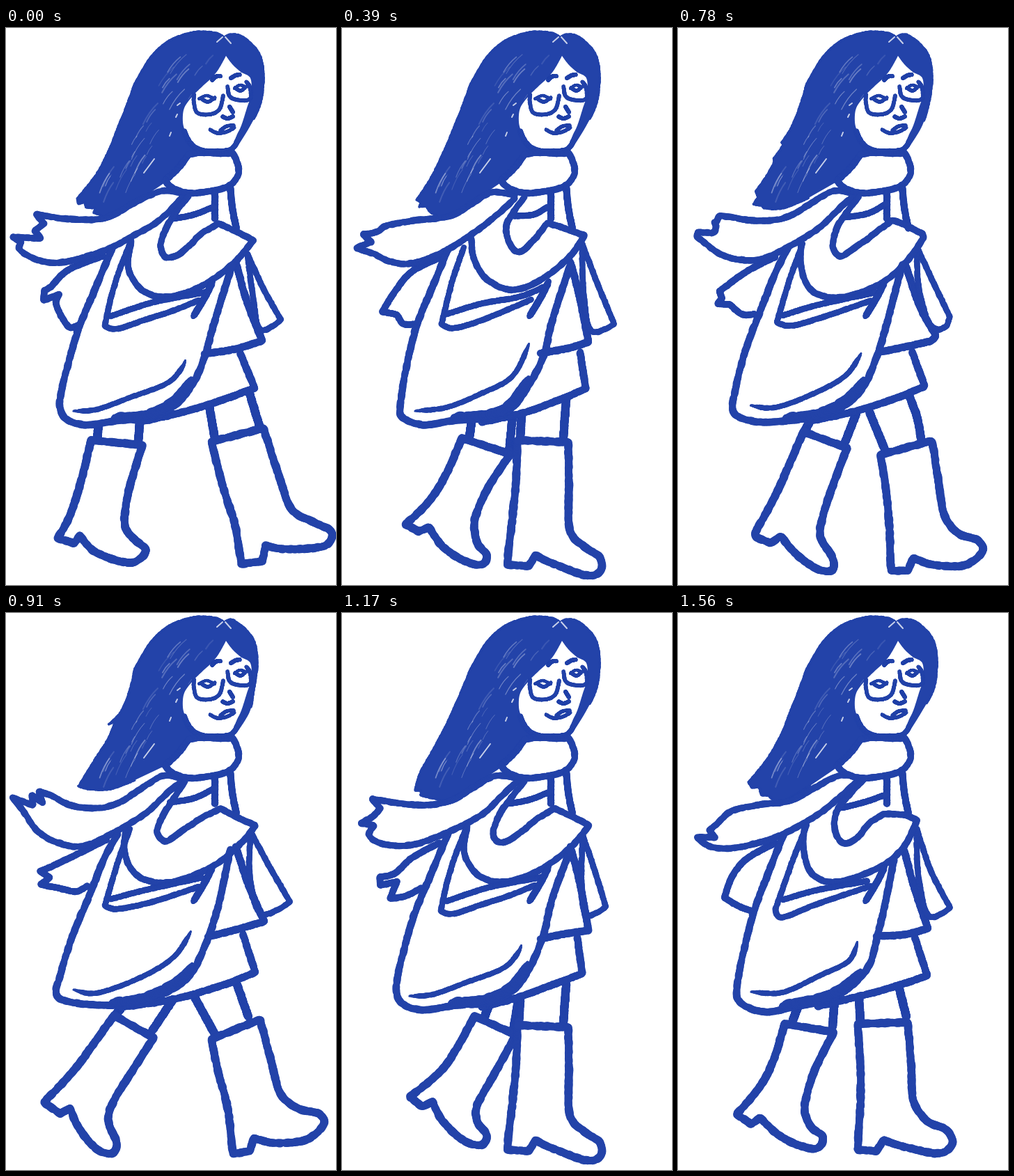
An HTML page with a canvas that plays this animation: 474 by 800 pixels, repeating every 1690 ms.

```html
<!DOCTYPE html>
<html lang="en">
<head>
<meta charset="utf-8">
<title>Walking girl</title>
<style>
html, body { margin: 0; width: 100%; height: 100%; overflow: hidden; background: #fff; }
canvas { display: block; width: 100vw; height: 100vh; }
</style>
</head>
<body>
<canvas id="stage" width="474" height="800"></canvas>
<script>
const ctx = document.getElementById('stage').getContext('2d');
const BLUE = '#2343a9', HOLD = 130, COUNT = 13, N = 240;

// Strokes are "x,y" points; "!" marks a corner, "z" closes, "|" separates strokes.
const poses = [
  { at: 0, side: 370,
    hair: '185,80 172,115 160,145 148,175 130,210 102,245! 104,253! 113,250! 115,258! 128,259! 126,265! 134,268 150,272 190,248',
    tail: '255,238 225,234 190,248 155,268 130,275 85,274 43,267! 55,281! 41,291! 50,302! 9,300! 22,308! 20,319 45,333 75,337 110,330 150,316 185,297 215,280 240,258 255,240',
    tail2: '140,327 90,347 65,371 55,377! 54,391! 76,383! 72,396 80,415 92,430 107,425',
    bag: '152,318 130,370 105,430 90,480 78,530 79,550 90,564 118,570 160,564 205,560 245,540 270,508 285,473 300,420 325,340',
    seam: '97,550 130,548 180,530 230,511 250,492 258,477',
    mouth: '180,305 163,348 150,390 142,428! 160,432 200,419 240,406 277,391|150,414 185,402 220,392 290,379',
    sleeve: '180,307 175,340 185,365 205,382 235,386 270,376 300,359 330,335 355,305! 330,292 305,281! 280,296 262,314 245,327 229,329 222,312 230,288 245,263 262,242',
    lapel: '240,274 270,268 298,257',
    coat: '330,335 345,390 368,449! 330,461 285,468',
    cuff: '347,325 370,375 395,419! 365,433 354,380 z',
    skirt: '336,466 346,490 357,517! 300,538 245,554 190,566',
    back: ['133,570 131,590|192,568 190,595', '122,592! 108,650 92,700 74,733! 98,740! 106,729! 126,751 160,765 185,767 201,750 185,735 171,715 175,670 196,599! z'],
    front: ['292,543 300,590|350,525 365,575', '295,594! 312,660 329,715 338,770! 368,766! 373,743! 395,748 430,748 461,742 467,723 440,709 410,691 391,640 370,575! z'] },
  { at: 2, side: 366,
    hair: '185,80 172,115 155,160 138,187! 126,194! 133,196! 122,215 99,235! 119,237! 97,247! 118,251! 116,258! 130,261 158,263 190,248',
    tail: '248,240 212,235 185,250 160,269 125,277 92,268 74,246 62,237! 52,238! 56,270! 42,260 29,258! 31,276 38,290! 32,295 43,310! 37,318 55,331 90,336 125,328 165,308 200,285 230,262 246,245',
    tail2: '150,325 115,345 80,358 70,365! 62,379! 86,375! 80,395 90,415 107,428',
    bag: '165,315 145,345 122,400 100,445 85,500 75,543 85,562 118,570 160,563 205,557 240,540 258,510 280,465 300,410 328,340',
    seam: '97,550 150,541 200,522 235,505 251,475',
    mouth: '190,295 165,340 145,425! 158,432 200,420 277,390|150,415 190,400 245,388 290,378',
    sleeve: '183,305 185,335 195,365 212,387 250,385 285,368 320,340 355,305! 325,290 298,279! 275,309 258,328 240,331 224,318 224,288 244,263 262,243',
    lapel: '240,270 275,267 298,256',
    coat: '328,335 340,390 353,456! 320,461 272,469',
    cuff: '347,325 364,370 382,430! 355,435 347,380 z',
    skirt: '338,465 346,531! 300,543 250,555 205,562',
    back: ['170,568 158,582|225,560 222,590 210,608', '152,580! 125,620 90,660 48,690! 66,706! 82,699! 96,730 120,755 147,766 158,752 149,733 155,705 180,665 214,617! z'],
    front: ['272,548 276,588|337,533 335,585', '265,590! 266,650 264,700 254,770! 285,771! 294,757! 320,768 365,782 390,772 386,752 361,738 344,715 342,650 340,590! z'] },
  { at: 3, side: 370,
    hair: '185,80 172,115 160,145 146,178 128,215 107,247! 113,250! 111,257! 121,256! 126,264! 134,268 150,272 190,248',
    tail: '248,240 215,236 190,250 155,270 100,277 64,284 50,293 30,296! 42,307! 20,316! 48,325! 68,335 100,338 145,322 195,290 230,262 248,245',
    tail2: '140,330 100,350 75,380 58,408! 78,412 88,425 109,425',
    bag: '152,318 135,360 110,420 95,475 84,540 88,560 118,570 160,564 215,559 245,545 270,510 290,470 302,420 328,340',
    seam: '105,550 150,545 200,525 245,500 269,453',
    mouth: '175,315 158,365 143,425! 160,431 200,420 272,390|150,411 200,396 255,386 290,372',
    sleeve: '186,303 189,330 205,358 235,375 265,372 300,352 330,325 348,298! 320,288 295,280! 275,305 255,322 241,310 236,285 248,262 262,243',
    lapel: '245,270 275,268 295,257',
    coat: '328,335 342,390 354,451! 325,460 285,467',
    cuff: '345,310 366,365 391,425! 358,435 347,380 z',
    skirt: '342,465 350,518! 310,535 260,553 200,566',
    back: ['186,566 183,588|245,558 240,608', '172,589! 150,640 125,680 91,713! 110,723! 125,717! 145,745 175,765 200,771 208,757 194,739 191,705 210,660 242,612! z'],
    front: ['258,556 256,588|322,533 318,588', '252,592! 250,650 245,700 237,771! 268,773! 278,757! 300,768 350,786 371,780 370,760 348,745 327,720 326,650 325,595! z'] },
  { at: 5, side: 369, blink: true,
    hair: '185,80 170,120 152,165 140,186! 127,196! 132,200! 122,222 105,243! 119,248! 112,258! 126,258! 125,264! 152,265 190,248',
    tail: '250,238 220,234 190,250 155,269 110,277 56,286! 71,300! 66,315! 37,325! 75,336 115,334 150,320 200,290 230,262 250,242',
    tail2: '135,332 100,350 75,378 60,404! 80,400! 85,420 103,430',
    bag: '155,315 135,360 112,420 95,475 85,535 90,560 122,570 165,564 210,559 245,540 268,510 285,465 300,410 322,340',
    seam: '112,543 150,544 200,525 240,505 261,477',
    mouth: '180,310 160,365 142,425! 165,430 205,416 277,390|150,415 200,398 285,380',
    sleeve: '182,308 183,340 190,370 210,385 245,385 290,368 325,335 351,289! 325,275 307,272! 280,300 255,318 238,328 228,315 230,285 245,262 262,243',
    lapel: '240,272 275,267 298,253',
    coat: '322,340 345,405 370,440! 364,454! 290,466',
    cuff: '335,315 356,370 379,430! 365,432 342,372 z',
    skirt: '332,468 351,513! 300,535 245,553 205,564',
    back: ['213,563 208,580|272,553 270,590', '205,582! 195,630 182,690 164,756! 190,760! 205,745! 230,765 270,783 290,780 282,758 262,735 260,700 265,650 274,596! z'],
    front: ['280,553 295,608|335,530 348,565 350,600', '286,614! 292,660 288,720 286,782! 310,786! 320,768! 345,780 390,787 418,770 411,752 385,740 371,710 367,650 365,602! z'] },
  { at: 7, side: 361,
    hair: '185,80 178,110 165,142 147,160! 157,156! 146,182 128,210 104,249! 120,253 150,253 185,240',
    tail: '252,238 225,234 190,255 165,271 135,280 95,277 65,262 47,256! 53,273! 37,261! 39,276! 9,265! 25,285 45,313 75,330 110,335 150,318 200,288 230,260 252,242',
    tail2: '145,325 105,345 70,362 49,371! 63,380! 50,390! 75,395 100,400 117,392',
    bag: '160,318 140,355 118,410 95,465 78,520 72,545 85,557 130,563 175,562 215,552 260,525 285,480 305,420 322,340',
    seam: '97,541 130,546 190,525 240,495 266,457',
    mouth: '178,310 160,360 142,420! 160,425 210,415 277,393|150,411 200,398 282,380',
    sleeve: '172,313 170,340 180,368 205,385 245,385 300,362 340,328 358,305! 335,295 308,281! 280,295 250,315 230,328 217,315 225,292 240,268 257,242',
    lapel: '235,272 270,266 301,251',
    coat: '330,335 348,390 371,443! 330,455 290,465',
    cuff: '352,315 376,360 408,415! 366,432 350,375 z',
    skirt: '340,460 358,516! 310,535 240,555 165,566',
    back: ['165,568 155,580|240,555 210,600', '155,578! 125,620 95,660 54,703! 78,719! 92,711! 105,740 130,770 152,776 159,761 147,730 155,700 180,660 212,610! z'],
    front: ['270,550 300,605|330,528 348,580', '295,612! 305,660 318,710 326,777! 350,773! 356,754! 385,761 430,757 456,735 449,719 420,712 394,690 380,640 365,584! z'] },
  { at: 9, side: 370,
    hair: '185,80 166,125 150,160 130,198 112,230 105,255! 113,255! 113,262! 130,266 152,268 190,248',
    tail: '255,238 220,234 190,250 155,270 110,276 43,267! 55,280! 46,291! 27,302! 46,305! 39,320 60,332 100,333 145,318 200,290 230,262 254,240',
    tail2: '140,330 100,352 76,374 54,379! 55,391! 79,386! 69,410! 90,407 114,395',
    bag: '152,318 130,370 105,430 90,480 78,537 88,562 118,570 160,564 210,559 248,540 272,505 290,460 302,410 328,340',
    seam: '97,550 130,548 180,530 230,511 250,492 258,477',
    mouth: '180,305 163,348 150,390 142,428! 160,432 200,419 240,406 277,391|150,414 185,402 220,392 290,379',
    sleeve: '180,307 175,340 185,365 205,382 235,386 270,376 300,359 330,335 355,305! 330,292 305,281! 280,296 250,320 229,330 217,318 226,290 245,263 262,242',
    lapel: '240,274 270,268 298,257',
    coat: '328,335 342,390 354,456! 320,461 285,468',
    cuff: '346,320 363,370 379,422! 350,433 344,380 z',
    skirt: '338,465 345,518! 300,535 250,553 200,566',
    back: ['210,566 203,585|253,558 245,605', '190,579! 165,625 140,660 97,695! 115,709! 130,702! 145,730 175,758 200,764 208,750 194,730 195,705 220,660 250,606! z'],
    front: ['256,556 254,588|322,533 318,588', '252,592! 250,650 245,700 237,771! 268,773! 278,757! 300,768 350,786 371,780 370,760 348,745 327,720 326,650 325,595! z'] },
  { at: 12, side: 372,
    hair: '185,80 172,115 160,145 148,175 128,210 101,243! 106,251! 116,250! 120,262! 130,262! 148,271 190,248',
    tail: '264,235 230,234 195,252 160,270 120,275 78,284 57,302 45,312! 53,322! 27,322! 45,335 75,338 115,330 150,318 200,290 235,262 262,238',
    tail2: '140,330 100,352 78,378 67,409! 85,420 105,428',
    bag: '152,318 135,360 112,420 98,470 85,535 90,560 125,573 165,566 215,555 250,535 275,505 285,470 298,415 310,355',
    seam: '105,544 150,545 205,520 245,500 258,472',
    mouth: '185,305 165,355 140,425! 150,437 200,418 277,392|150,412 200,398 272,385',
    sleeve: '182,305 180,335 188,368 210,385 245,383 295,362 325,335 343,298! 325,290 295,289! 275,302 255,325 236,330 225,310 228,285 245,262 268,238',
    lapel: '235,280 270,271 298,261',
    coat: '325,340 338,390 359,453! 325,462 285,464',
    cuff: '343,310 363,370 391,423! 360,435 345,375 z',
    skirt: '340,465 358,521! 300,540 250,553 200,565',
    back: ['172,566 165,585|225,556 222,595', '153,590! 138,640 118,680 84,720! 105,734! 118,725! 145,750 175,765 200,769 208,752 191,738 182,710 195,660 224,602! z'],
    front: ['260,553 262,588|318,540 328,580', '258,590! 262,650 262,700 258,771! 285,773! 295,757! 330,768 375,776 394,762 385,742 358,730 338,700 335,650 330,588! z'] }
];
const PARTS = ['hair', 'tail', 'tail2', 'bag', 'seam', 'mouth', 'sleeve', 'lapel', 'coat', 'cuff', 'skirt'];

let seed = 1;
const rand = () => (seed = seed * 16807 % 2147483647) / 2147483647;
const lerp = (a, b, k) => a + (b - a) * k;

// Smooth curve through the points, broken at corners.
function spline(text) {
  const pts = text.trim().split(' ').filter(s => s !== 'z').map(s => {
    const [x, y] = s.split(',').map(parseFloat);
    return { x, y, corner: s.endsWith('!') };
  });
  if (text.trim().endsWith('z')) pts.push({ ...pts[0], corner: true });
  const slope = (i, c) => pts[i].corner ? 0 :
    ((pts[i + 1] || pts[i])[c] - (pts[i - 1] || pts[i])[c]) / 2;
  const out = [];
  for (let i = 0; i < pts.length - 1; i++) {
    for (let s = 0; s < 20; s++) {
      const t = s / 20, u = 1 - t;
      out.push(['x', 'y'].map(c =>
        (1 + 2 * t) * u * u * pts[i][c] + t * u * u * slope(i, c) +
        t * t * (3 - 2 * t) * pts[i + 1][c] - t * t * u * slope(i + 1, c)));
    }
  }
  const last = pts[pts.length - 1];
  out.push([last.x, last.y]);
  return out;
}

// Equal spacing lets curves with different point counts blend.
function even(pts) {
  const len = [0];
  for (let i = 1; i < pts.length; i++)
    len.push(len[i - 1] + Math.hypot(pts[i][0] - pts[i - 1][0], pts[i][1] - pts[i - 1][1]));
  const total = len[len.length - 1], out = [];
  for (let n = 0, i = 1; n <= N; n++) {
    const d = total * n / N;
    while (i < pts.length - 1 && len[i] < d) i++;
    const k = (d - len[i - 1]) / (len[i] - len[i - 1] || 1);
    out.push([lerp(pts[i - 1][0], pts[i][0], k), lerp(pts[i - 1][1], pts[i][1], k)]);
  }
  return out;
}

const curves = text => text.split('|').map(s => even(spline(s)));
const blend = (a, b, k) => a.map((line, j) =>
  line.map((p, i) => [lerp(p[0], b[j][i][0], k), lerp(p[1], b[j][i][1], k)]));

for (const p of poses) {
  for (const name of PARTS) p[name] = curves(p[name]);
  p.back = p.back.map(curves);
  p.front = p.front.map(curves);
}

function poseAt(index) {
  const i = poses.findLastIndex(p => p.at <= index), a = poses[i], b = poses[i + 1];
  if (a.at === index) return a;
  const k = (index - a.at) / (b.at - a.at);
  const passing = a.at === 3 || a.at === 9;
  const limb = (from, to) => from.map((c, j) => blend(c, to[j], k));
  const mid = { side: lerp(a.side, b.side, k) };
  for (const name of PARTS) mid[name] = blend(a[name], b[name], k);
  const lead = limb(a.front, passing ? b.back : b.front);
  const trail = limb(a.back, passing ? b.front : b.back);
  const swapped = passing && k > 0.4;
  mid.front = swapped ? trail : lead;
  mid.back = swapped ? lead : trail;
  return mid;
}

function fill(pts, color) {
  ctx.fillStyle = color;
  ctx.beginPath();
  pts.forEach(p => ctx.lineTo(p[0], p[1]));
  ctx.fill();
}

// Chalky brush: short segments of slightly uneven width.
function brush(pts, width, taper = false) {
  ctx.strokeStyle = BLUE;
  ctx.lineCap = 'round';
  for (let i = 1; i < pts.length; i++) {
    const ease = taper ? Math.min(1, 0.35 + 2.5 * Math.sin(Math.PI * i / pts.length)) : 1;
    ctx.lineWidth = width * ease * (0.9 + 0.22 * rand());
    const dx = (rand() - 0.5) * 0.8, dy = (rand() - 0.5) * 0.8;
    ctx.beginPath();
    ctx.moveTo(pts[i - 1][0] + dx, pts[i - 1][1] + dy);
    ctx.lineTo(pts[i][0] + dx, pts[i][1] + dy);
    ctx.stroke();
  }
}
const draw = (lines, width, taper) => lines.forEach(l => brush(l, width, taper));

const fixed = {
  crown: curves('313,13 300,7 270,6 235,18 208,42 185,80')[0],
  face: curves('316,40! 306,58 296,71 283,83 268,98 256,115 254,135 258,150 264,163 274,172 290,175 318,174 328,168 331,155 338,140 346,115 352,95 351,72 337,63 325,52 z')[0],
  chin: curves('256,148 263,163 274,173 290,177 318,176 328,170 334,158'),
  collar: curves('262,182! 246,203 228,219! 240,230 262,237 295,234 320,227 333,212 333,196 326,180! 305,180 280,179 z'),
  body: curves('300,236 300,274|322,226 325,258 331,288'),
  strap: curves('298,362 285,388 268,416'),
  glasses: curves('270,95 270,108 275,122 294,124 307,116 312,97|318,84 322,99 338,104 351,101 350,84 345,77'),
  brows: curves('296,75 301,70 308,69|323,72 330,68 336,67'),
  lids: curves('277,102 288,97 300,102|328,87 336,82 345,85'),
  eyes: curves('280,101 290,106 300,100|329,86 337,90 345,84'),
  nose: curves('321,113 326,121|311,127 318,130 326,127'),
  lips: curves('293,146 304,151 317,149 328,143|308,147 317,141 327,140')
};

function drawHead(p) {
  const s = p.side;
  const right = curves(`240,214 258,194 264,180! 330,174! 350,142 ${s - 5},110 ${s},75 ${s - 3},45 ${s - 15},25 ${s - 33},11 322,9! 313,13`)[0];
  const outline = [...fixed.crown, ...p.hair[0], ...right];
  fill(outline, BLUE);
  brush([...fixed.crown, ...p.hair[0]], 3);
  brush(right.slice(N >> 1), 3);
  // Dry-brush gaps following the hair.
  ctx.strokeStyle = '#fff';
  for (let i = 0; i < 34; i++) {
    const u = rand(), x = lerp(278, 168, u) + (rand() - 0.5) * 55, y = lerp(28, 205, u) + rand() * 18;
    const len = 8 + rand() * 24, bend = lerp(0.85, 0.5, u);
    ctx.globalAlpha = 0.1 + rand() * 0.3;
    ctx.lineWidth = 0.6 + rand() * 1.6;
    ctx.beginPath();
    ctx.moveTo(x, y);
    ctx.quadraticCurveTo(x - len * bend * 0.6, y + len * 0.4, x - len * bend, y + len);
    ctx.stroke();
  }
  ctx.globalAlpha = 0.75;
  for (const [x, y, dx, dy] of [[311, 13, -8, 7], [315, 13, 8, 9], [250, 108, -4, 3], [246, 124, -2, 4], [237, 150, -2, 5], [213, 188, -15, 20]]) {
    ctx.lineWidth = 2;
    ctx.beginPath();
    ctx.moveTo(x, y);
    ctx.lineTo(x + dx, y + dy);
    ctx.stroke();
  }
  ctx.globalAlpha = 1;
  fill(fixed.face, '#fff');
  draw(fixed.chin, 7);
  draw(fixed.glasses, 5);
  draw(fixed.brows, 5);
  if (!p.blink) draw(fixed.lids, 3.5);
  draw(fixed.eyes, 4.5);
  draw(fixed.nose, 5);
  draw(fixed.lips, 4.5);
}

function drawLeg([leg, boot]) {
  fill([...leg[0], ...[...leg[1]].reverse()], '#fff');
  draw(leg, 11);
  fill(boot[0], '#fff');
  draw(boot, 11);
}

function drawPose(p) {
  seed = 77;
  ctx.fillStyle = '#fff';
  ctx.fillRect(0, 0, 474, 800);
  drawHead(p);
  drawLeg(p.back);
  drawLeg(p.front);
  draw(p.skirt, 10);
  draw(p.tail2, 9);
  fill(p.tail[0], '#fff');
  draw(p.tail, 9);
  fill(fixed.collar[0], '#fff');
  draw(fixed.collar, 9);
  draw(fixed.body, 9);
  draw(p.coat, 10);
  draw(p.cuff, 8);
  draw(p.lapel, 8);
  draw(p.sleeve, 9);
  draw(p.mouth, 8);
  draw(p.bag, 10);
  const shade = p.bag[0].slice(N * 0.52 | 0, N * 0.73 | 0).map(([x, y]) => [x - 4, y - 4]);
  brush(shade, 14, true);
  draw(p.seam, 7, true);
  draw(fixed.strap, 9, true);
}

const start = performance.now();
let shown = -1;
function tick() {
  const index = Math.floor((performance.now() - start) / HOLD) % COUNT;
  if (index !== shown) drawPose(poseAt(shown = index));
  requestAnimationFrame(tick);
}
tick();
</script>
</body>
</html>
```
